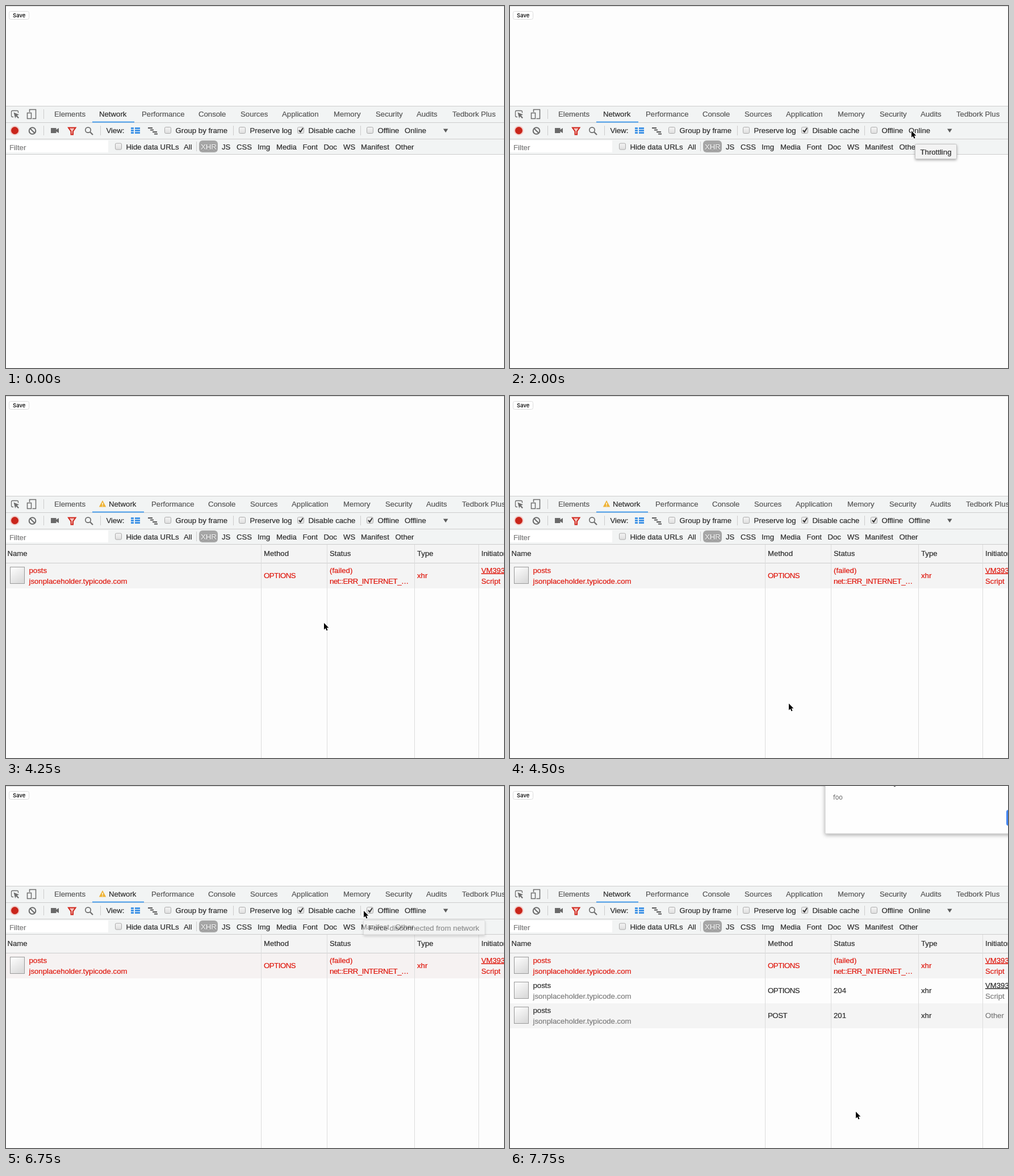
These frames come from a looping animation (877x638 px, 8000 ms). An HTML page:

```html
<!DOCTYPE html>
<html lang="en">
<head>
<meta charset="utf-8">
<title>Offline request retry</title>
<style>
  html, body { margin: 0; height: 100%; overflow: hidden; background: #fdfdfd; }
  svg { display: block; width: 100vw; height: 100vh; }
  text {
    font: 13.2px "Liberation Sans", Arial, sans-serif; white-space: pre;
    color: #2c2c2c; fill: currentColor; stroke: currentColor; stroke-width: .2px;
  }
  .ui { font-family: Inter, sans-serif; stroke: none; }
  .tab { color: #555; }
  .dim { color: #7c7c7c; }
  .red { color: #df160c; }
  .link { text-decoration: underline; }
  .caps { letter-spacing: -.45px; }
  .pill { color: #fff; text-shadow: 0 1px 1px #777; }
</style>
</head>
<body>
<svg id="stage" viewBox="0 0 877 638">
  <defs>
    <linearGradient id="file" x2=".6" y2="1"><stop stop-color="#fff"/><stop offset="1" stop-color="#dcdcdc"/></linearGradient>
    <linearGradient id="box" x2="0" y2="1"><stop stop-color="#f4f4f4"/><stop offset="1" stop-color="#dedede"/></linearGradient>
    <filter id="soft" x="-20%" y="-40%" width="140%" height="200%"><feDropShadow dx="0" dy="2" stdDeviation="2" flood-opacity=".3"/></filter>
    <filter id="deep" x="-20%" y="-40%" width="140%" height="200%"><feDropShadow dx="0" dy="2" stdDeviation="3.5" flood-opacity=".35"/></filter>
  </defs>
</svg>
<script>
const stage = document.getElementById('stage');
const $ = id => document.getElementById(id);

const text = (x, y, s, cls = '', extra = '') => `<text x="${x}" y="${y}" class="${cls}" ${extra}>${s}</text>`;
const rect = (x, y, w, h, fill, extra = '') => `<rect x="${x}" y="${y}" width="${w}" height="${h}" fill="${fill}" ${extra}/>`;
const path = (d, stroke, width = 1, fill = 'none') => `<path d="${d}" stroke="${stroke}" stroke-width="${width}" fill="${fill}"/>`;
const hline = (y, color = '#cdcdcd') => rect(0, y, 877, 1, color);
const sep = (x, y) => rect(x, y, 1, 17, '#ccc');
const group = (id, body) => `<g id="${id}">${body}</g>`;
const tick = x => path(`M${x + 3} 219l2.5 3 4.5-7`, '#333', 2);
const check = (x, y, label) =>
  rect(x + .5, y + .5, 11, 11, 'url(#box)', 'rx="2" stroke="#aaa"') + text(x + 19.5, y + 11, label);
const row = (items, y, cls) => items.map(([x, s]) => text(x, y, s, cls)).join('');

const tip = (id, x, y, w, s) => group(id,
  rect(x + .5, y + .5, w, 26, '#f3f3f3', 'rx="2" stroke="#c4c4c4" filter="url(#soft)"') + text(x + 9.5, y + 19, s));

const request = (id, i, cls, sub, method, status, from) => {
  const y = 295 + 44 * i, [link, note] = from;
  return group(id,
    rect(0, y, 877, 44, i % 2 ? '#fdfdfd' : '#f4f4f4', `id="${id}Bg"`) +
    rect(7.5, y + 6.5, 25, 29, 'url(#file)', 'stroke="#999"') +
    text(40.5, y + 16.5, 'posts', cls) + text(40.5, y + 35.5, 'jsonplaceholder.typicode.com', sub) +
    text(454, y + 26, method, cls + ' caps') +
    status.map((s, k) => text(570, y + (status[1] ? 16.5 + 19 * k : 26), s, cls + (k ? ' caps' : ''))).join('') +
    text(724, y + 26, 'xhr', cls) +
    (link ? text(837, y + 16.5, link, cls + ' link') : '') +
    text(837, y + (link ? 35.5 : 26), note, sub));
};

const page = hline(0, '#d6d6d6') +
  rect(5.5, 9.5, 35, 14, '#fff', 'rx="3" stroke="#dcdcdc"') +
  text(12, 20, 'Save', 'ui', 'style="font-size:9.5px;font-weight:500;color:#000"');

const tabs = rect(0, 176, 877, 86, '#f2f4f4') + [176, 205, 234, 261].map(y => hline(y)).join('') +
  path('M13 195.500h-1.500q-2 0-2-2v-7q0-2 2-2h8q2 0 2 2v2', '#6e6e6e', 1.3) +
  '<path d="M13.500 187.500l9.500 4-3.600 1.400 3.600 3.800-1.600 1.600-3.700-3.800-1.500 3.500z" fill="#6e6e6e"/>' +
  path('M41.500 187v-4.500h11v16h-6M37.500 188.500h7v10h-7z', '#6e6e6e', 1.5) + sep(66, 182) +
  text(85, 194.5, 'Elements', 'tab') +
  group('warn', '<path d="M170 184l6.200 11.500h-12.400z" fill="#eeb235"/>' + path('M170 188v4M170 193v1.300', '#fff', 1.4)) +
  rect(152, 203.5, 74, 2, '#4a9fee', 'id="under"') +
  group('tabs', text(164, 194.5, 'Network') + row([
    [239, 'Performance'], [339, 'Console'], [413, 'Sources'], [486, 'Application'], [577, 'Memory'],
    [651, 'Security'], [723, 'Audits'], [786, 'Tedbork Plus']], 194.5, 'tab'));

const bars = [0, 1, 2].map(i => rect(220, 214 + 4 * i, 5, 3, '#3f93e6') + rect(227, 214 + 4 * i, 9, 3, '#3f93e6')).join('') +
  [0, 1, 2, 3].map(i => rect(250 + 4 * i - (i > 2), 214 + 3.5 * i, i % 2 ? 6 : 8, 2, '#555')).join('');

const tools = '<circle cx="15.500" cy="219.500" r="8.500" fill="#f3cfcc"/><circle cx="15.500" cy="219.500" r="6.500" fill="#c9251b"/>' +
  '<circle cx="46.500" cy="220" r="5.800" fill="none" stroke="#6a6a6a" stroke-width="2"/>' + path('M42.500 216l8 8', '#6a6a6a', 2) +
  sep(66, 211) + '<path d="M79 215h9.500v3l4.500-3v9l-4.500-3v3H79z" fill="#6a6a6a"/>' +
  path('M110 214.500h12.500l-4.500 6.500v5.500h-3.500V221z', '#d0261c', 2, '#f5c4bf') +
  '<circle cx="144.500" cy="218.500" r="4.700" fill="none" stroke="#6e6e6e" stroke-width="1.700"/>' + path('M148 222l5 5', '#6e6e6e', 2.2) +
  sep(166, 211) + text(176.5, 224, 'View:') + bars +
  check(279, 213, 'Group by frame') + sep(400, 211) + check(410, 213, 'Preserve log') +
  check(513, 213, 'Disable cache') + tick(513) + sep(624, 211) + check(635, 213, 'Offline') +
  group('ticked', tick(635)) + text(702, 224, 'Online', '', 'id="speed"') +
  '<path d="M770 216.500h8.500l-4.200 6.500z" fill="#5c5c5c"/>';

const filters = rect(0, 237, 180, 21, '#fff') + text(6, 253.5, 'Filter', 'dim') +
  check(192, 241.5, 'Hide data URLs') + text(313, 252.5, 'All') + sep(335, 239) +
  rect(340, 237, 33, 21, '#a6a6a6', 'rx="6"') + text(343, 252.5, 'XHR', 'pill') +
  row([[380, 'JS'], [406, 'CSS'], [443, 'Img'], [476, 'Media'], [522.5, 'Font'], [559.5, 'Doc'],
    [594, 'WS'], [625, 'Manifest'], [685.5, 'Other']], 252.5);

const table = group('table', rect(0, 262, 877, 32, '#f4f4f4') + hline(294) +
  row([[2.5, 'Name'], [454, 'Method'], [570, 'Status'], [724, 'Type'], [837, 'Initiator']], 282) +
  request('failed', 0, 'red', 'red', 'OPTIONS', ['(failed)', 'net::ERR_INTERNET_…'], ['VM393:1', 'Script']) +
  request('preflight', 1, '', 'dim', 'OPTIONS', ['204'], ['VM393:1', 'Script']) +
  request('post', 2, '', 'dim', 'POST', ['201'], ['', 'Other']) +
  [449, 565, 719, 832].map(x => rect(x, 262, 1, 376, '#dcdcdc')).join(''));

const dialog = group('dialog',
  rect(555, -20, 360, 104, '#fefefe', 'stroke="#bbb" stroke-width=".7" filter="url(#deep)"') +
  path('M679.500 -1q-1 2-3.500 1.600', '#444', 1.3) +
  text(569, 24, 'foo', 'ui', 'style="font-size:11px;color:#666"') + rect(874, 42, 40, 28, '#4285f4', 'rx="4"'));

const cursor = group('cursor', '<path d="M0 0V11.800L2.700 9.300 4.500 13.500 6.500 12.700 4.700 8.600H8.400Z" fill="#000" stroke="#fff" stroke-width="2" paint-order="stroke"/>');

stage.insertAdjacentHTML('beforeend', page + tabs + tools + filters + table + dialog +
  tip('throttle', 713, 243, 73, 'Throttling') + tip('force', 629, 236, 214, 'Force disconnected from network') + cursor);

// pointer stops: time, x, y
const stops = [
  [500, 10, 13], [750, 445, 159], [1250, 848, 216], [1500, 849, 216], [1750, 782, 307], [2000, 707, 220],
  [2250, 631, 219], [2750, 634, 217], [3000, 631, 175], [3250, 696, 150], [3500, 640, 105], [3750, 618, 92],
  [4000, 618, 92], [4250, 560, 400], [4500, 491, 542], [5000, 190, 524], [5250, 300, 505], [5500, 385, 487],
  [6000, 682, 345], [6250, 776, 305], [6500, 632, 217], [6750, 630, 220], [7000, 633, 219], [7250, 636, 260],
  [7750, 609, 574], [8000, 609, 574]];

function pointer(t) {
  const i = Math.max(1, stops.findIndex(s => s[0] > t));
  const [t0, x0, y0] = stops[i - 1], [t1, x1, y1] = stops[i];
  const k = (t - t0) / (t1 - t0);
  return [x0 + (x1 - x0) * k, y0 + (y1 - y0) * k];
}

const show = (id, on) => $(id).setAttribute('opacity', +on);

function draw(t) {
  const within = (a, b) => t >= a && t < b;
  const offline = within(2500, 7000), warned = within(3000, 7250);
  show('warn', warned);
  $('tabs').setAttribute('transform', `translate(${warned ? 17 : 0})`);
  $('under').setAttribute('width', warned ? 91 : 74);
  show('ticked', offline);
  $('speed').textContent = offline ? 'Offline' : 'Online';
  show('table', t >= 4250);
  show('preflight', t >= 7250);
  show('post', t >= 7500);
  $('failedBg').setAttribute('fill', within(4750, 7250) ? '#f6f2f2' : '#f4f4f4');
  show('dialog', t >= 7750);
  show('throttle', within(2000, 2250));
  show('force', within(2250, 3000) || within(6500, 6750) ? 1 : within(6750, 7000) ? .5 : 0);
  show('cursor', t >= 500);
  $('cursor').setAttribute('transform', `translate(${pointer(t)})`);
}

// the screen refreshes four times a second
function frame() {
  draw(Math.floor(performance.now() % 8000 / 250) * 250);
  requestAnimationFrame(frame);
}
frame();
</script>
</body>
</html>
```
